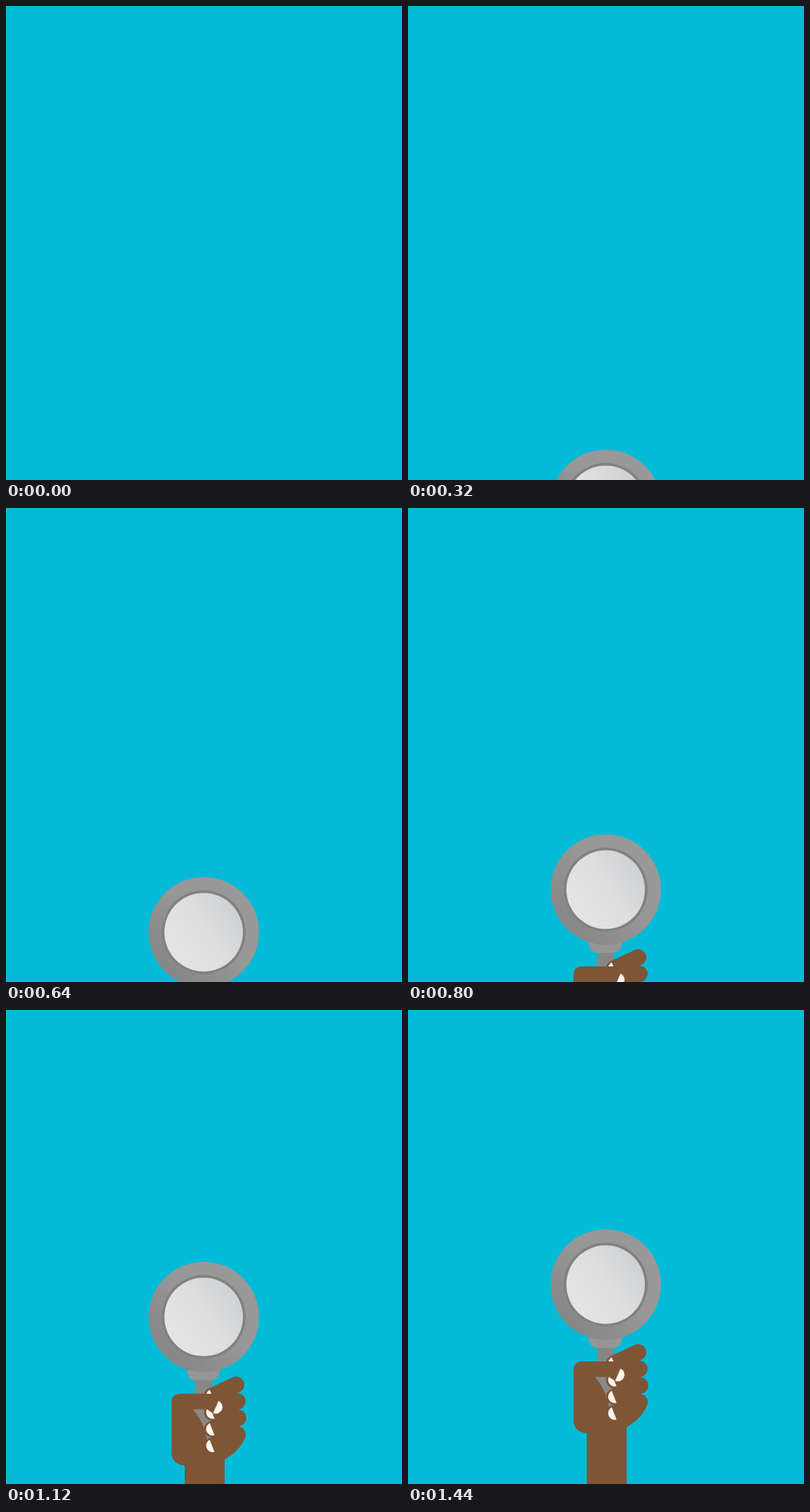
An HTML page that plays this animation: 585 px wide and 700 px high, repeating every 2400 ms.

```html
<!DOCTYPE html>
<html lang="en">
<head>
<meta charset="utf-8">
<title>Magnifying glass</title>
<style>
  html, body { margin: 0; height: 100%; overflow: hidden; background: #03bbd7; }
  svg { display: block; width: 100%; height: 100%; }
  .skin { fill: #7f5537; }
  .finger { stroke: #7f5537; stroke-width: 24; stroke-linecap: round; }
  .nail { fill: #fff4eb; }
</style>
</head>
<body>
<svg viewBox="0 0 585 700">
  <defs>
    <linearGradient id="metal" x1=".15" y1=".85" x2=".85" y2=".15">
      <stop offset="0" stop-color="#868686"/>
      <stop offset=".55" stop-color="#979797"/>
      <stop offset="1" stop-color="#999"/>
    </linearGradient>
    <linearGradient id="glass" x1=".1" y1=".75" x2=".87" y2=".25">
      <stop offset="0" stop-color="#e4e4e4"/>
      <stop offset=".55" stop-color="#dedede"/>
      <stop offset="1" stop-color="#d0d2d5"/>
    </linearGradient>
  </defs>
  <g id="lift">
    <path fill="#868686" d="M279 490H304V550H279Z"/>
    <path fill="#969696" d="M266 478L268 490Q270 499 282 499H301Q313 499 315 490L317.500 478Z"/>
    <circle cx="292.200" cy="405.500" r="81.500" fill="url(#metal)"/>
    <circle cx="292" cy="405.500" r="62" fill="#828282"/>
    <circle cx="292" cy="405.500" r="58" fill="url(#glass)"/>
    <path class="skin" d="M244.500 532Q244.500 519 257.500 519H305L330 530 342 579 353.500 583Q346 603 323 616V1100H264V625Q244.500 623 244.500 605Z"/>
    <path fill="#898989" d="M275 541H304V590H297.500Q293 560 275 541Z"/>
    <g id="fingers"></g>
    <path class="skin" d="M257 519H306Q318 523 314 530L306 548 297 542H257Z"/>
    <path class="nail" d="M314 529.500A9.800 9.800 0 0 1 306 547.500Z"/>
  </g>
</svg>
<script>
const LOOP = 2400, RISE = 1440, STEP = 40, DEPTH = 379;
const lift = document.getElementById('lift');

// Knuckle positions; each fingertip curls round to the handle.
const knuckles = [[340, 505.5], [342, 530], [343, 554.5], [342, 579]];
document.getElementById('fingers').innerHTML = knuckles.map(([x, y], i) => {
  const tip = 522 + i * 24.6;
  return `<path class="finger" d="M304.500 ${tip}L${x} ${y}"/>
    <path class="nail" d="M301 ${tip - 9}A9.700 9.700 0 0 0 308 ${tip + 9}Z"/>`;
}).join('');

function draw(now) {
  const t = Math.floor((now % LOOP) / STEP) * STEP;
  const p = Math.min(t / RISE, 1);
  const eased = p * p * (3 - 2 * p);
  lift.setAttribute('transform', `translate(0 ${DEPTH * (1 - eased)})`);
  requestAnimationFrame(draw);
}
draw(0);
</script>
</body>
</html>
```
